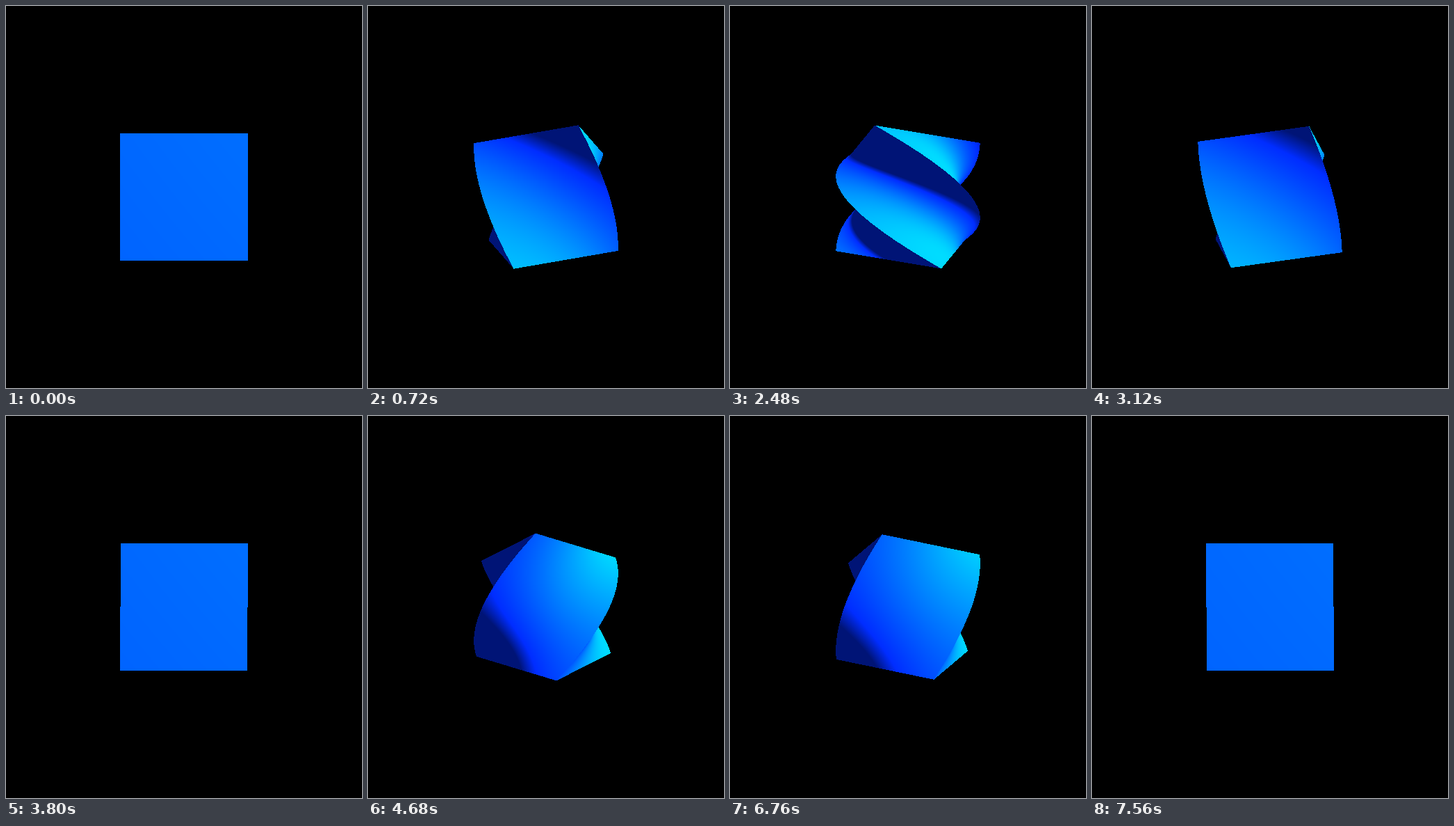
These frames come from a looping animation (512 px wide and 549 px high, 7600 ms). An HTML page with a canvas:

```html
<!DOCTYPE html>
<html lang="en">
<head>
<meta charset="utf-8">
<title>Twisting cube</title>
<style>
  html, body { margin: 0; height: 100%; overflow: hidden; background: #000; }
  canvas { display: block; }
</style>
</head>
<body>
<canvas id="stage" width="512" height="549"></canvas>
<script>
const W = 512, H = 549, LOOP = 7600, STEP = 40;
const FOCAL = H / 2, CAMERA = 4, GRID = 40;
const MAX_TWIST = 83 * Math.PI / 180;
const LIGHT = [15, 12, 10];

const ctx = document.getElementById('stage').getContext('2d');
const image = ctx.createImageData(W, H);
const pixels = new Uint32Array(image.data.buffer);
const depth = new Float32Array(W * H);
const BLACK = 0xff000000;

// A point on one side of the cube, twisted about the vertical axis, lit and projected.
function vertex(side, u, v, twist) {
  const angle = twist * v + side * Math.PI / 2;
  const s = Math.sin(angle), c = Math.cos(angle);
  const x = u * c + s, z = c - u * s, ny = twist * u;
  const lx = LIGHT[0] - x, ly = LIGHT[1] - v, lz = LIGHT[2] - z;
  const w = 1 / (CAMERA - z);
  return {
    x: W / 2 + FOCAL * x * w,
    y: H / 2 - FOCAL * v * w,
    w,
    lit: (s * lx + ny * ly + c * lz) / (Math.hypot(1, ny) * Math.hypot(lx, ly, lz))
  };
}

function colour(lit) {
  const d = Math.max(0, lit);
  const g = Math.round(20 + 200 * d);
  const b = Math.min(255, Math.round(118 + 1100 * d));
  return (BLACK | b << 16 | g << 8) >>> 0;
}

function triangle(a, b, c) {
  const area = (b.x - a.x) * (c.y - a.y) - (b.y - a.y) * (c.x - a.x);
  if (area >= 0) return; // faces away
  const x0 = Math.floor(Math.min(a.x, b.x, c.x)), x1 = Math.ceil(Math.max(a.x, b.x, c.x));
  const y0 = Math.floor(Math.min(a.y, b.y, c.y)), y1 = Math.ceil(Math.max(a.y, b.y, c.y));
  for (let y = y0; y <= y1; y++) {
    for (let x = x0; x <= x1; x++) {
      const px = x + 0.5 - a.x, py = y + 0.5 - a.y;
      const q = (px * (c.y - a.y) - py * (c.x - a.x)) / area;
      const r = ((b.x - a.x) * py - (b.y - a.y) * px) / area;
      const p = 1 - q - r;
      if (p < -1e-6 || q < -1e-6 || r < -1e-6) continue;
      const w = p * a.w + q * b.w + r * c.w, i = y * W + x;
      if (w <= depth[i]) continue;
      depth[i] = w;
      pixels[i] = colour(p * a.lit + q * b.lit + r * c.lit);
    }
  }
}

function draw(t) {
  const swing = Math.sin(t / 1200);
  const twist = -MAX_TWIST * swing * Math.abs(swing);
  pixels.fill(BLACK);
  depth.fill(0);
  for (let side = 0; side < 4; side++) {
    let below;
    for (let j = 0; j <= GRID; j++) {
      const row = [];
      for (let i = 0; i <= GRID; i++) {
        row.push(vertex(side, 2 * i / GRID - 1, 2 * j / GRID - 1, twist));
      }
      for (let i = 0; below && i < GRID; i++) {
        triangle(below[i], below[i + 1], row[i + 1]);
        triangle(below[i], row[i + 1], row[i]);
      }
      below = row;
    }
  }
  ctx.putImageData(image, 0, 0);
}

const start = performance.now();
let shown = -1;
function tick() {
  const t = Math.floor((performance.now() - start) % LOOP / STEP) * STEP;
  if (t !== shown) draw(shown = t);
  requestAnimationFrame(tick);
}
tick();
</script>
</body>
</html>
```
